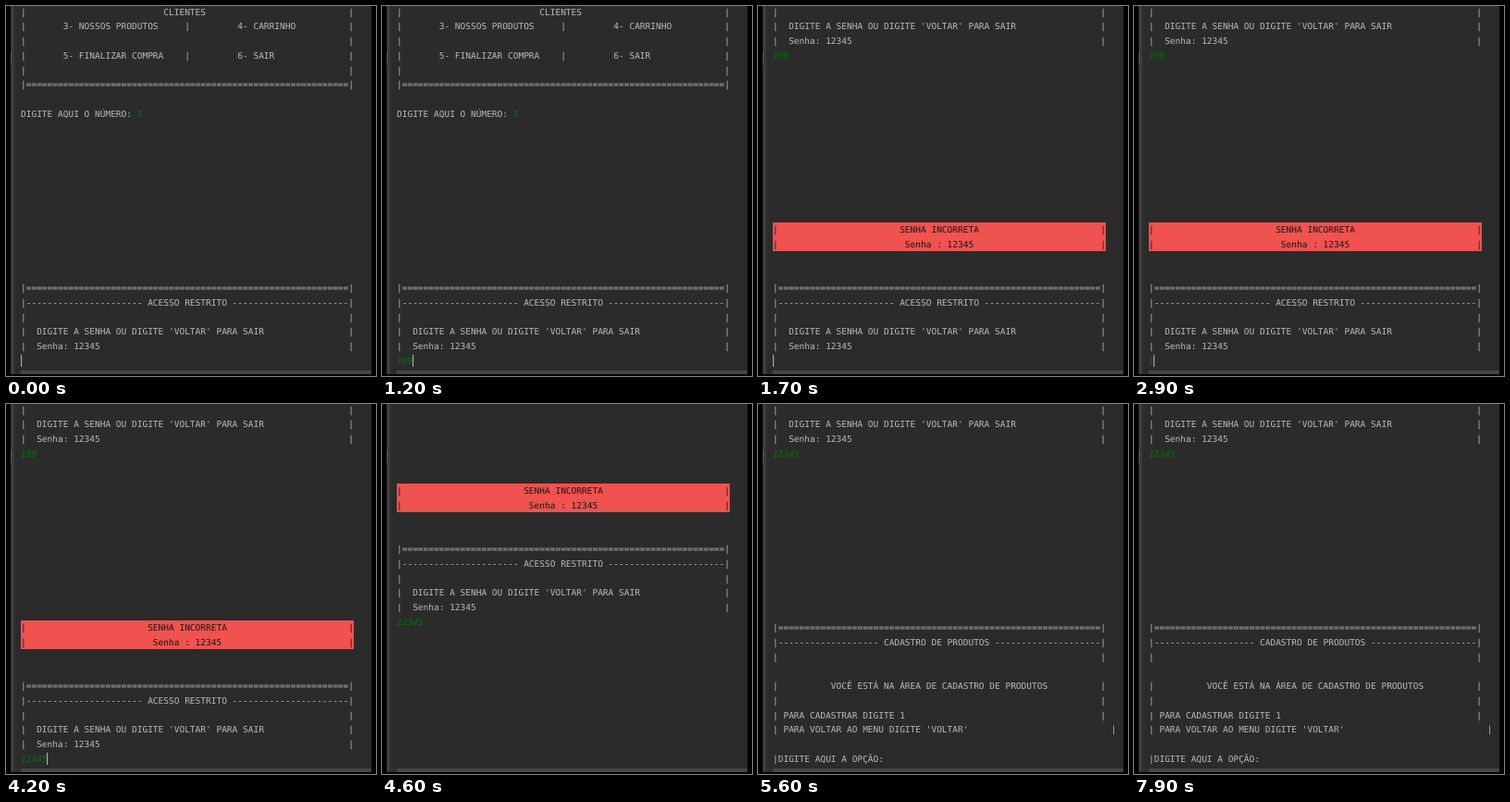
An HTML page with a canvas that plays this animation: 400x400 px, repeating every 8 s.

```html
<!DOCTYPE html>
<html lang="pt-BR">
<head>
<meta charset="utf-8">
<title>Terminal</title>
<style>
  html, body { margin: 0; width: 100%; height: 100%; overflow: hidden; background: #000; }
  canvas { display: block; width: 100vmin; height: 100vmin; }
</style>
</head>
<body>
<canvas width="400" height="400"></canvas>
<script>
const ctx = document.querySelector('canvas').getContext('2d');
const LOOP = 8000, STEP = 100;
const LEFT = 16, CELL = 40 / 7, MIDDLE = 6.2, PITCH = 110 / 7, COLUMNS = 63;
const GREY = '#bababa', GREEN = '#08700c', RED = '#f0524f', INK = '#1c1616';
const FONT = '9.5px "DejaVu Sans Mono", monospace';

// Each line is a list of [column, text, style] pieces.
const text = (column, string, style = '') => [column, string, style];
const boxed = (...pieces) => [text(0, '|'), ...pieces, text(62, '|')];
const alert = (column, string) =>
  boxed(text(column, string)).map(([c, s]) => text(c, s, 'alert'));
const typed = string => [text(0, string, 'input')];
const blank = count => Array.from({ length: count }, () => []);
const rule = [text(0, `|${'='.repeat(61)}|`)];
const heading = title => {
  const spare = 59 - title.length, left = spare >> 1;
  return [text(0, `|${'-'.repeat(left)} ${title} ${'-'.repeat(spare - left)}|`)];
};
const login = [
  rule,
  heading('ACESSO RESTRITO'),
  boxed(),
  boxed(text(3, "DIGITE A SENHA OU DIGITE 'VOLTAR' PARA SAIR")),
  boxed(text(3, 'Senha: 12345')),
];
const lines = [
  boxed(text(27, 'CLIENTES')),
  boxed(text(8, '3- NOSSOS PRODUTOS'), text(31, '|'), text(41, '4- CARRINHO')),
  boxed(),
  boxed(text(8, '5- FINALIZAR COMPRA'), text(31, '|'), text(41, '6- SAIR')),
  boxed(),
  rule,
  [],
  [text(0, 'DIGITE AQUI O NÚMERO:'), text(22, '3', 'input')],
  ...blank(11),
  ...login,
  typed('109'),
  ...blank(11),
  alert(24, 'SENHA INCORRETA'),
  alert(25, 'Senha : 12345'),
  ...blank(2),
  ...login,
  typed('12345'),
  ...blank(11),
  rule,
  heading('CADASTRO DE PRODUTOS'),
  boxed(),
  [],
  boxed(text(11, 'VOCÊ ESTÁ NA ÁREA DE CADASTRO DE PRODUTOS')),
  boxed(),
  boxed(text(2, 'PARA CADASTRAR DIGITE 1')),
  [text(0, "| PARA VOLTAR AO MENU DIGITE 'VOLTAR'"), text(64, '|')],
  [],
  [text(0, '|DIGITE AQUI A OPÇÃO:')],
];

// [time, line of the caret, text on that line up to the caret]
const events = [
  [0, 24, ''], [900, 24, '1'], [1100, 24, '10'], [1200, 24, '109'],
  [1400, 39, ''], [1500, 42, ''], [1600, 45, ''],
  [2800, 45, '1'], [3100, 45, '12'], [3400, 45, '123'], [3600, 45, '1234'], [3900, 45, '12345'],
  [4400, 66, '|DIGITE AQUI A OPÇÃO: '], [5100, 66, '|DIGITE AQUI A OPÇÃO: '],
];
const SCROLL_START = 4393, SCROLL_TIME = 443;

function scrollAt(time, caretLine) {
  const bottom = caretLine - 24;
  if (time < SCROLL_START) return bottom;
  const progress = Math.min(1, (time - SCROLL_START) / SCROLL_TIME);
  return 42 - 21 * (1 + Math.cos(Math.PI * progress)) / 2;
}

function fill(color, x, y, w, h) {
  ctx.fillStyle = color;
  ctx.fillRect(x, y, w, h);
}

function drawLine(pieces, y) {
  if (pieces.some(piece => piece[2] === 'alert')) {
    const top = Math.round(y - PITCH / 2), bottom = Math.round(y + PITCH / 2);
    fill(RED, LEFT, top, COLUMNS * CELL, bottom - top);
  }
  for (const [column, string, style] of pieces) {
    ctx.font = (style === 'input' ? 'italic ' : '') + FONT;
    ctx.fillStyle = { input: GREEN, alert: INK }[style] || GREY;
    [...string].forEach((char, i) => ctx.fillText(char, LEFT + (column + i) * CELL, y + 3.5));
  }
}

function drawCaret(column, y) {
  fill('#b0b0b0', Math.floor(LEFT + column * CELL), Math.round(y - 6.5), 1.1, 13);
}

function draw(time) {
  const [since, caretLine, before] = events.findLast(event => event[0] <= time);
  const scroll = scrollAt(time, caretLine);
  const yOf = line => MIDDLE + (line - scroll) * PITCH;

  fill('#000', 0, 0, 400, 400);
  fill('#3d3b3c', 5, 0, 4, 398);
  fill('#5a5859', 5, 50, 1, 13);
  fill('#2b2b2c', 9, 0, 386, 398);

  ctx.textRendering = 'geometricPrecision';
  lines.slice(0, caretLine).forEach((line, i) => {
    const y = yOf(i);
    if (y > -PITCH && y < 400 + PITCH) drawLine(line, y);
  });
  drawLine(caretLine === 66 ? lines[66] : typed(before), yOf(caretLine));

  fill('#484546', 16, 394, 379, 4);
  fill('#000', 0, 398, 400, 2);

  const blinkOn = since === 4400 || (time - since) % 1000 < 500;
  if (blinkOn) drawCaret(before.length, yOf(caretLine));
}

function tick(now) {
  draw(Math.floor(now % LOOP / STEP) * STEP);
  requestAnimationFrame(tick);
}
requestAnimationFrame(tick);
</script>
</body>
</html>
```
